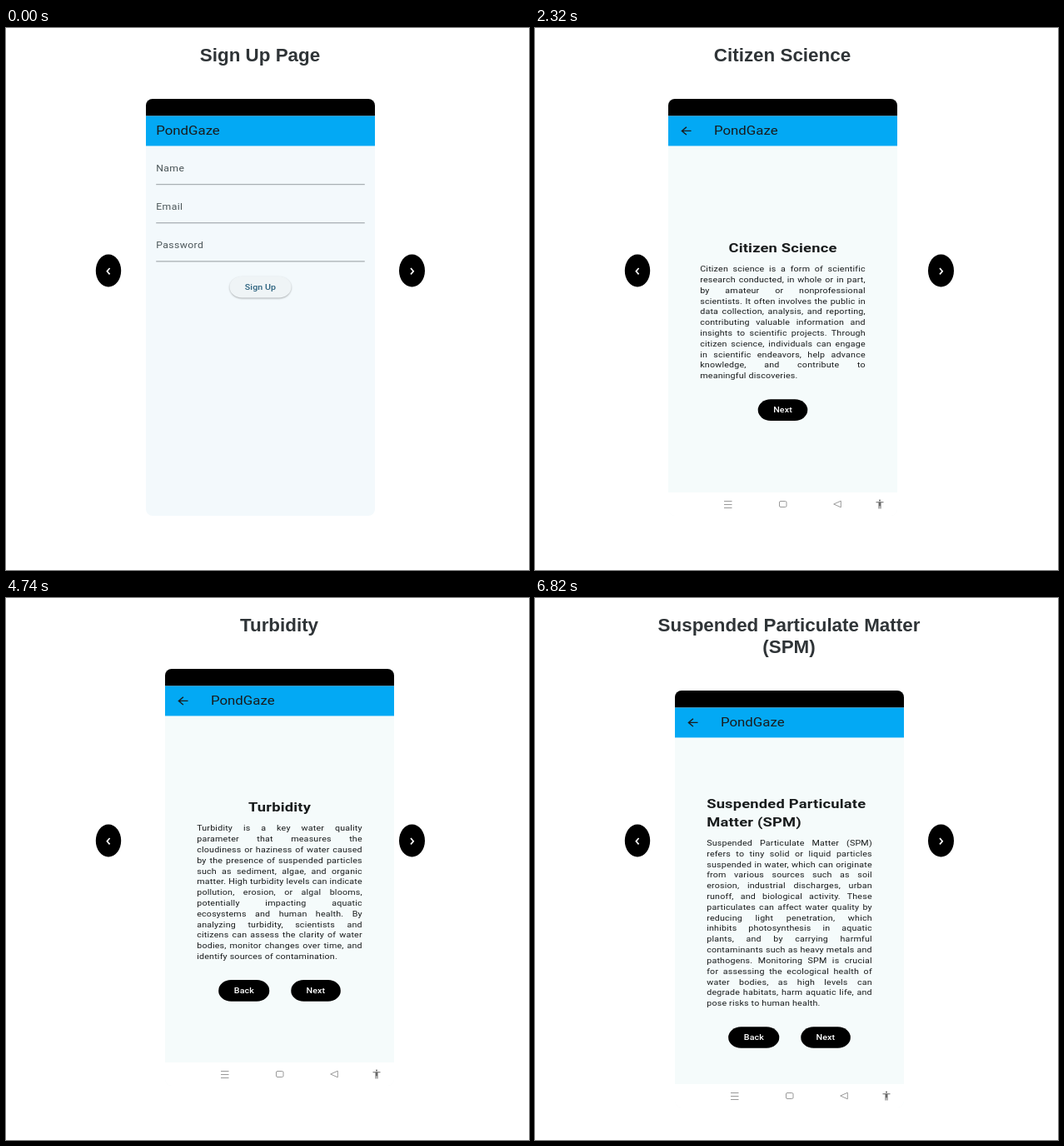
Recreate the animation shown at these times as an HTML page. Size 628 by 650 pixels, loop 8000 ms.

```html
<!DOCTYPE html>
<html lang="en">
<head>
<meta charset="utf-8">
<title>App screens carousel</title>
<style>
  html, body { margin: 0; width: 100%; height: 100%; overflow: hidden; background: #fff; }
  .viewport { position: absolute; left: 105px; top: 0; width: 400px; height: 650px; overflow: hidden; }
  .track { position: absolute; left: 0; top: 0; height: 650px; }
  .slide { position: absolute; top: 0; width: 400px; height: 650px; }
  .caption {
    position: absolute; top: 20px; width: 400px; text-align: center; white-space: pre;
    font: bold 22.4px/26px "Liberation Sans", Arial, sans-serif; color: #2f3437;
  }
  .phone {
    position: absolute; left: 63px; top: 85px; width: 275px; height: 500px;
    border-radius: 8px; overflow: hidden; background: #f5fbfb;
  }
  .tall .phone { top: 111px; }
  .signup .phone { background: #f3f9fc; }

  /* A 360 x 780 screen shown in a 275 x 500 box */
  .screen {
    position: absolute; left: 0; top: 0; width: 360px; height: 780px;
    transform: scale(calc(275 / 360), calc(500 / 780)); transform-origin: 0 0;
    font: 14px/20.02px Roboto, sans-serif; letter-spacing: .25px; color: #191c1d;
  }
  .status { position: absolute; width: 360px; height: 32px; background: #000; }
  .bar {
    position: absolute; top: 32px; width: 360px; height: 56px; background: #03a9f4;
    font-size: 22px; line-height: 56px; letter-spacing: 0; text-indent: 72px; color: #191c1e;
  }
  .signup .bar { text-indent: 16px; }
  .bar svg { position: absolute; left: 16px; top: 16px; fill: #191c1e; }
  .content {
    position: absolute; left: 50px; top: 88px; width: 260px; height: 692px;
    display: flex; flex-direction: column; align-items: center; justify-content: center;
  }
  .heading { font-size: 24px; font-weight: 700; line-height: 34.32px; white-space: pre; margin-bottom: 12px; }
  .tall .heading { align-self: flex-start; }
  .text { width: 260px; }
  .text div { height: 20.02px; text-align: justify; }
  .text div:not(:last-child) { text-align-last: justify; word-spacing: -1px; }
  .buttons { display: flex; gap: 34px; margin: 34px 0 4px; }
  .button {
    height: 40px; padding: 0 24px; border-radius: 20px; background: #000; color: #fff;
    font-weight: 500; line-height: 40px; letter-spacing: .1px; white-space: nowrap;
  }
  .field {
    position: absolute; left: 16px; width: 328px; height: 56px; line-height: 54px;
    font-size: 16px; letter-spacing: .5px; color: #4b5659;
  }
  .field::after {
    content: ""; position: absolute; left: 0; top: 55px; width: 100%; height: 1.5px; background: #a9b0b4;
  }
  .submit {
    position: absolute; left: 180px; top: 332px; transform: translateX(-50%);
    background: #eff4f6; color: #2d637f; box-shadow: 0 1.5px 3px rgba(0, 0, 0, .3);
  }
  .nav { position: absolute; left: 0; top: 0; }
  .arrows { position: absolute; left: 0; top: 0; }
</style>
</head>
<body>
<div class="viewport"><div class="track" id="track"></div></div>
<svg class="arrows" width="628" height="650">
  <ellipse cx="123" cy="291" rx="15.2" ry="19.6"/>
  <ellipse cx="487.5" cy="291" rx="15.5" ry="19.6"/>
  <path d="M124.6 288 121.4 291.7 124.6 295.4M486 288 489.2 291.7 486 295.4"
        fill="none" stroke="#fff" stroke-width="1.7"/>
</svg>
<script>
const APP = 'PondGaze';
const PITCH = 400, LOOP = 8000;

const topics = [
  { title: 'Citizen Science', buttons: ['Next'], text: `Citizen science is a form of scientific
research conducted, in whole or in part,
by amateur or nonprofessional
scientists. It often involves the public in
data collection, analysis, and reporting,
contributing valuable information and
insights to scientific projects. Through
citizen science, individuals can engage
in scientific endeavors, help advance
knowledge, and contribute to
meaningful discoveries.` },
  { title: 'Water Quality', text: `Water Quality is the assessment of a
water sample's attributes against
specific criteria. Assessing water
quality involves various tests, including
assessments of color, smell,
temperature, acidity, presence of
bacteria, biodiversity, and more. These
approaches typically involves obtaining
measurements of various water quality
parameters which can be broadly
categorized into physical, chemical,
biological, and radioactive
measurements.` },
  { title: 'Turbidity', text: `Turbidity is a key water quality
parameter that measures the
cloudiness or haziness of water caused
by the presence of suspended particles
such as sediment, algae, and organic
matter. High turbidity levels can indicate
pollution, erosion, or algal blooms,
potentially impacting aquatic
ecosystems and human health. By
analyzing turbidity, scientists and
citizens can assess the clarity of water
bodies, monitor changes over time, and
identify sources of contamination.` },
  { title: 'Suspended Particulate Matter\n(SPM)', heading: 'Suspended Particulate\nMatter (SPM)', kind: 'tall',
    text: `Suspended Particulate Matter (SPM)
refers to tiny solid or liquid particles
suspended in water, which can originate
from various sources such as soil
erosion, industrial discharges, urban
runoff, and biological activity. These
particulates can affect water quality by
reducing light penetration, which
inhibits photosynthesis in aquatic
plants, and by carrying harmful
contaminants such as heavy metals and
pathogens. Monitoring SPM is crucial
for assessing the ecological health of
water bodies, as high levels can
degrade habitats, harm aquatic life, and
pose risks to human health.` }
];

const backIcon = `<svg width="24" height="24"><path d="M20 11H7.83l5.59-5.59L12 4l-8 8 8 8 1.41-1.41L7.83 13H20z"/></svg>`;
const navBar = `<svg class="nav" width="275" height="500">
  <rect y="472" width="275" height="28" fill="#fff"/>
  <g fill="none" stroke="#999" stroke-width="1">
    <path d="M67 482.5h9.5M67 486.5h9.5M67 490.5h9.5M198.7 486 207.3 482.2V489.8z"/>
    <rect x="133.5" y="482.5" width="8.5" height="7" rx="1.5"/>
  </g>
  <path transform="translate(248 479.4) scale(.5 .55)" fill="#666"
    d="M12 2a2 2 0 0 1 0 4 2 2 0 0 1 0-4zm9 7h-6v13h-2v-6h-2v6H9V9H3V7h18z"/>
</svg>`;

const div = (name, html = '', style = '') => `<div class="${name}" style="${style}">${html}</div>`;

const signUpBody = ['Name', 'Email', 'Password']
  .map((label, i) => div('field', label, `top:${104 + 72 * i}px`)).join('') + div('button submit', 'Sign Up');

function topicBody({ title, heading = title, text, buttons = ['Back', 'Next'] }) {
  const lines = text.split('\n').map(line => `<div>${line}</div>`).join('');
  return div('content', div('heading', heading) + div('text', lines) +
    div('buttons', buttons.map(label => div('button', label)).join('')));
}

function slide(title, body, index, kind = '', icon = '', nav = '') {
  const screen = div('screen', div('status') + div('bar', icon + APP) + body);
  return div(`slide ${kind}`, div('caption', title) + div('phone', screen + nav), `left:${index * PITCH}px`);
}

const track = document.getElementById('track');
track.innerHTML = slide('Sign Up Page', signUpBody, 0, 'signup') +
  topics.map((t, i) => slide(t.title, topicBody(t), i + 1, t.kind, backIcon, navBar)).join('');

// Each move begins at `start`; the picture refreshes `steps` times from `first` to `last`.
const DURATION = 500;
const moves = [
  { start: 306, first: 330, last: 800, steps: 8 },
  { start: 2303, first: 2320, last: 2820, steps: 8 },
  { start: 4323, first: 4340, last: 4810, steps: 8 },
  { start: 6277, first: 6280, last: 6820, steps: 9 }
];

const bezier = (a, b, s) => 3 * (1 - s) ** 2 * s * a + 3 * (1 - s) * s * s * b + s ** 3;

// CSS "ease": cubic-bezier(.25, .1, .25, 1)
function ease(x) {
  if (x >= 1) return 1;
  let low = 0, high = 1;
  for (let i = 0; i < 24; i++) {
    const mid = (low + high) / 2;
    if (bezier(.25, .25, mid) < x) low = mid; else high = mid;
  }
  return bezier(.1, 1, low);
}

function progress({ start, first, last, steps }, t) {
  if (t < first) return 0;
  if (t >= last) return 1;
  const gap = (last - first) / (steps - 1);
  const shown = first + Math.floor((t - first) / gap) * gap;
  return ease((shown - start) / DURATION);
}

const origin = performance.now();
function draw(now) {
  const t = Math.max(0, now - origin) % LOOP;
  const position = moves.reduce((sum, move) => sum + progress(move, t), 0);
  track.style.transform = `translateX(${-Math.round(position * PITCH)}px)`;
  requestAnimationFrame(draw);
}
draw(origin);
</script>
</body>
</html>
```
